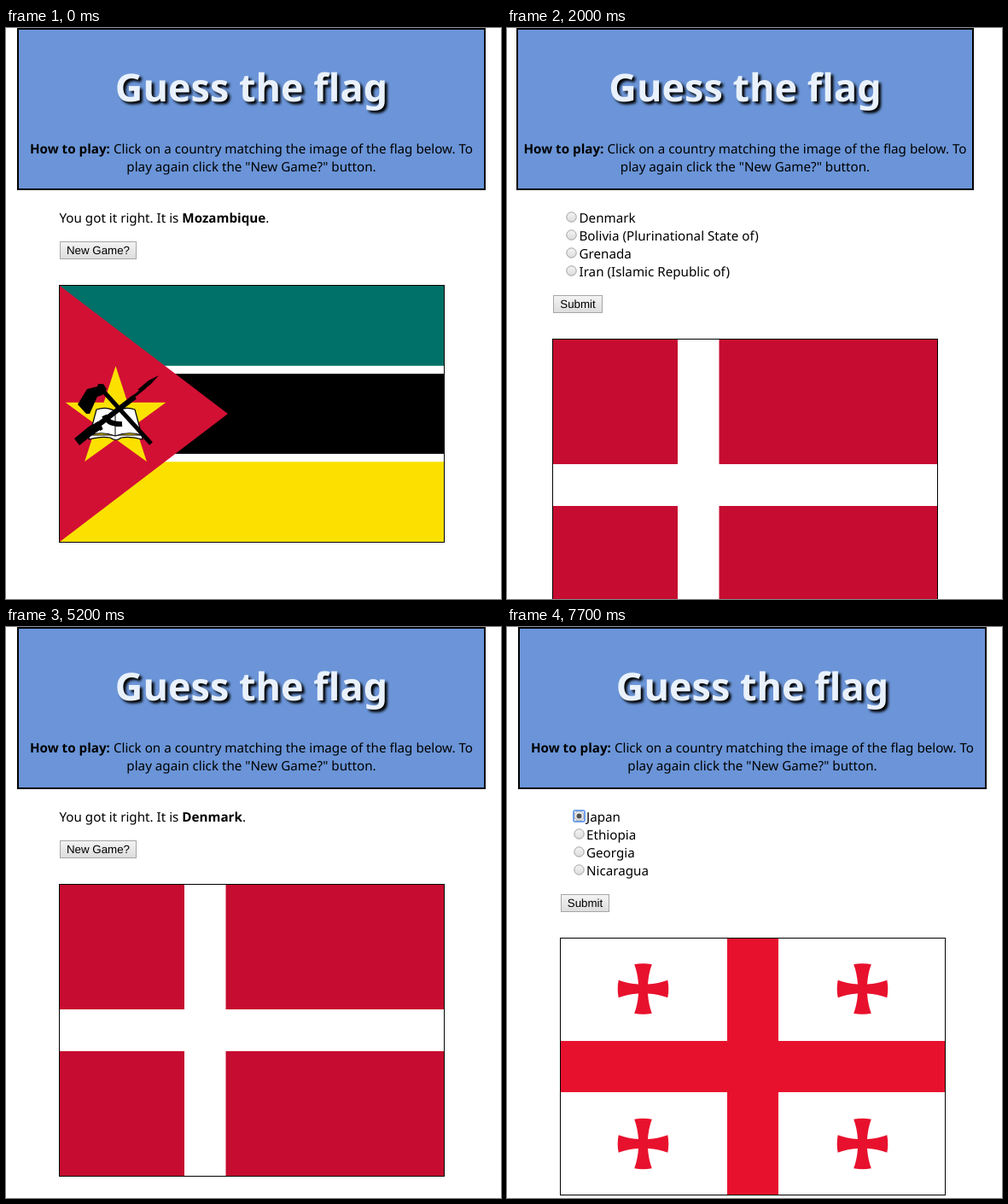
An HTML page for the animation above (8 s loop, 580x669 px).

```html
<!DOCTYPE html>
<html lang="en">
<head>
<meta charset="utf-8">
<title>Guess the flag</title>
<style>
  html, body { margin: 0; width: 100%; height: 100%; overflow: hidden; background: #fff; }
  svg { display: block; }
  text { font: 15.2px "Noto Sans", "Open Sans", sans-serif; text-rendering: geometricPrecision; white-space: pre; }
  .bold { font-weight: bold; }
  .mid { text-anchor: middle; }
  .title { font-size: 45px; font-weight: bold; fill: #e9f1fc; filter: drop-shadow(3px 3px 1.5px #000); }
  .label { font: 13.33px "Liberation Sans", Arial, sans-serif; }
</style>
</head>
<body>
<svg id="stage" width="580" height="669" viewBox="0 0 580 669">
  <defs>
    <linearGradient id="face" x2="0" y2="1"><stop stop-color="#f4f4f4"/><stop offset="1" stop-color="#dcdcdc"/></linearGradient>
    <linearGradient id="faceHover" x2="0" y2="1"><stop stop-color="#fafafa"/><stop offset="1" stop-color="#e4e4e4"/></linearGradient>
  </defs>
  <g id="page"></g>
</svg>
<script>
const LOOP = 8000;
const FOCUS = '#6f9fe8';
const page = document.getElementById('page');

const rect = (x, y, w, h, fill, extra = '') =>
  `<rect x="${x}" y="${y}" width="${w}" height="${h}" fill="${fill}" ${extra}/>`;
const path = (d, fill, extra = '') => `<path d="${d}" fill="${fill}" ${extra}/>`;
const text = (x, y, content, cls = '') => `<text x="${x}" y="${y}" class="${cls}">${content}</text>`;
const bold = content => `<tspan class="bold">${content}</tspan>`;
const line = (d, width) => path(d, 'none', `stroke="#000" stroke-width="${width}"`);

function star(cx, cy, r) {
  const points = Array.from({ length: 10 }, (_, i) => {
    const a = i * Math.PI / 5, d = i % 2 ? r * 0.382 : r;
    return `${cx + d * Math.sin(a)} ${cy - d * Math.cos(a)}`;
  });
  return path(`M${points.join('L')}Z`, '#fce100');
}

function smallCross(x, y) {
  const arm = 'M0 0L-5.5 -5.5Q-6.3 -18 -10.3 -28.8Q0 -30.8 10.3 -28.8Q6.3 -18 5.5 -5.5Z';
  return [0, 90, 180, 270].map(a =>
    path(arm, '#e8112d', `transform="translate(${x} ${y}) rotate(${a})"`)).join('') +
    rect(x - 5.5, y - 5.5, 11, 11, '#e8112d');
}

function emblem() {
  const outline = 'stroke="#000" stroke-width="1.2" stroke-linejoin="round"';
  return star(65.5, 156, 61.9) +
    path('M35 175l-1 5Q49 176 59 178Q66 183 72 178Q83 176 97 180L96 175Z', '#fff', outline) +
    path('M43 145Q55 141 65 147Q77 141 88 145L96 175Q80 170 65 176Q50 170 35 175Z', '#fff', outline) +
    line('M65 147V176', 1) +
    line('M47 119L107 185', 5) +
    path('M21 139L32 121L44 118L45 115L51 115L55 121L50 128L44 130L35 150L31 150Z', '#000') +
    // rifle: stock, body, magazine, grip, barrel
    path('M17 179L23 187L38 175L50 167L47 158L34 165Z', '#000') +
    line('M40 167L88 130', 6) +
    line('M52 152Q57 163 73 162', 6) +
    line('M43 160L49 169', 4) +
    line('M84 132L100 119', 3) +
    path('M91 122L104 111L116 105L107 115L97 123Z', '#000');
}

// Flags are drawn from the top left corner of their 450px wide field.
const flags = {
  Mozambique: {
    h: 300,
    art: () => rect(0, 0, 450, 93.75, '#007168') + rect(0, 103.1, 450, 93.8, '#000') +
      rect(0, 206.25, 450, 93.75, '#fce100') + path('M0 0L197 150L0 300Z', '#d21034') + emblem()
  },
  Denmark: {
    h: 341,
    art: () => rect(0, 0, 450, 341, '#c60c30') + rect(146, 0, 48.5, 341, '#fff') + rect(0, 146, 450, 49, '#fff')
  },
  Georgia: {
    h: 300,
    art: () => rect(195, 0, 60, 300, '#e8112d') + rect(0, 120, 450, 60, '#e8112d') +
      [96.5, 353.5].map(x => smallCross(x, 59) + smallCross(x, 240.5)).join('')
  }
};

function drawFlag(name, x, y) {
  const { h, art } = flags[name];
  return `<g transform="translate(${x} ${y})">${rect(-1, -1, 452, h + 2, '#000')}${rect(0, 0, 450, h, '#fff')}${art()}</g>`;
}

function button(x, y, w, label, look) {
  const hover = look === 'hover';
  const edge = look === 'focus'
    ? rect(x, y, w, 21, 'none', `rx="2" stroke="${FOCUS}" stroke-width="2"`)
    : rect(x + .5, y + .5, w - 1, 20, 'none', `stroke="${hover ? '#8c8c8c' : '#a6a6a6'}"`);
  return rect(x, y, w, 21, `url(#${hover ? 'faceHover' : 'face'})`) + edge +
    text(x + w / 2, y + 15, label, 'label mid');
}

function radio(x, y, checked, focused) {
  const circle = (r, attrs) => `<circle cx="${x}" cy="${y}" r="${r}" ${attrs}/>`;
  return circle(5.7, 'fill="url(#face)" stroke="#a0a0a0"') +
    (checked ? circle(3, 'fill="#505050"') : '') +
    (focused ? rect(x - 6.5, y - 6.5, 13, 13, 'none', `rx="2" stroke="${FOCUS}" stroke-width="2"`) : '');
}

function header(narrow, shift) {
  const [x, w] = narrow ? [11, 536] : [13, 549];
  const center = 287.5 + shift;
  return rect(x + 1, 1, w - 2, 188, '#6b95d8', 'stroke="#000" stroke-width="2"') +
    text(center, 86, 'Guess the flag', 'title mid') +
    text(center, 147, bold('How to play:') + ' Click on a country matching the image of the flag below. To', 'mid') +
    text(center, 168, 'play again click the "New Game?" button.', 'mid');
}

const result = (flag, look) => () =>
  header(false, 0) +
  text(62.5, 228, `You got it right. It is ${bold(flag)}.`) +
  button(63, 250, 90, 'New Game?', look) +
  drawFlag(flag, 63, 302);

// A tall flag brings in the page scrollbar, which narrows the layout.
const quiz = (names, flag, choice = -1, submitting = false) => () => {
  const narrow = flag === 'Denmark';
  const shift = narrow ? -8.5 : 0, left = narrow ? 54 : 63;
  return header(narrow, shift) +
    names.map((name, i) =>
      radio(left + 21.5, 221.5 + 21 * i, i === choice, i === choice && !submitting) +
      text(93 + shift, 228 + 21 * i, name)).join('') +
    button(left, 313, narrow ? 58 : 57, 'Submit', submitting ? 'focus' : '') +
    drawFlag(flag, left, 365);
};

const first = ['Denmark', 'Bolivia (Plurinational State of)', 'Grenada', 'Iran (Islamic Republic of)'];
const second = ['Japan', 'Ethiopia', 'Georgia', 'Nicaragua'];

const timeline = [
  [0, result('Mozambique')],
  [500, result('Mozambique', 'hover')],
  [1000, result('Mozambique')],
  [1500, result('Mozambique', 'focus')],
  [1900, quiz(first, 'Mozambique')],
  [2000, quiz(first, 'Denmark')],
  ...[[2500, 0], [2700, 1], [3000, 2], [3200, 3], [3500, 0], [3700, 3], [4100, 2], [4200, 1], [4400, 0]]
    .map(([at, choice]) => [at, quiz(first, 'Denmark', choice)]),
  [4900, quiz(first, 'Denmark', 0, true)],
  [5200, result('Denmark')],
  [5800, result('Denmark', 'focus')],
  [6100, quiz(second, 'Denmark')],
  [6300, quiz(second, 'Georgia')],
  [6900, quiz(second, 'Georgia', 0)],
  [7100, quiz(second, 'Georgia', 1)],
  [7700, quiz(second, 'Georgia', 0)]
];

let shown;
function frame() {
  const t = performance.now() % LOOP;
  const [, scene] = timeline.findLast(([at]) => at <= t);
  if (scene !== shown) page.innerHTML = (shown = scene)();
  requestAnimationFrame(frame);
}
frame();
</script>
</body>
</html>
```
